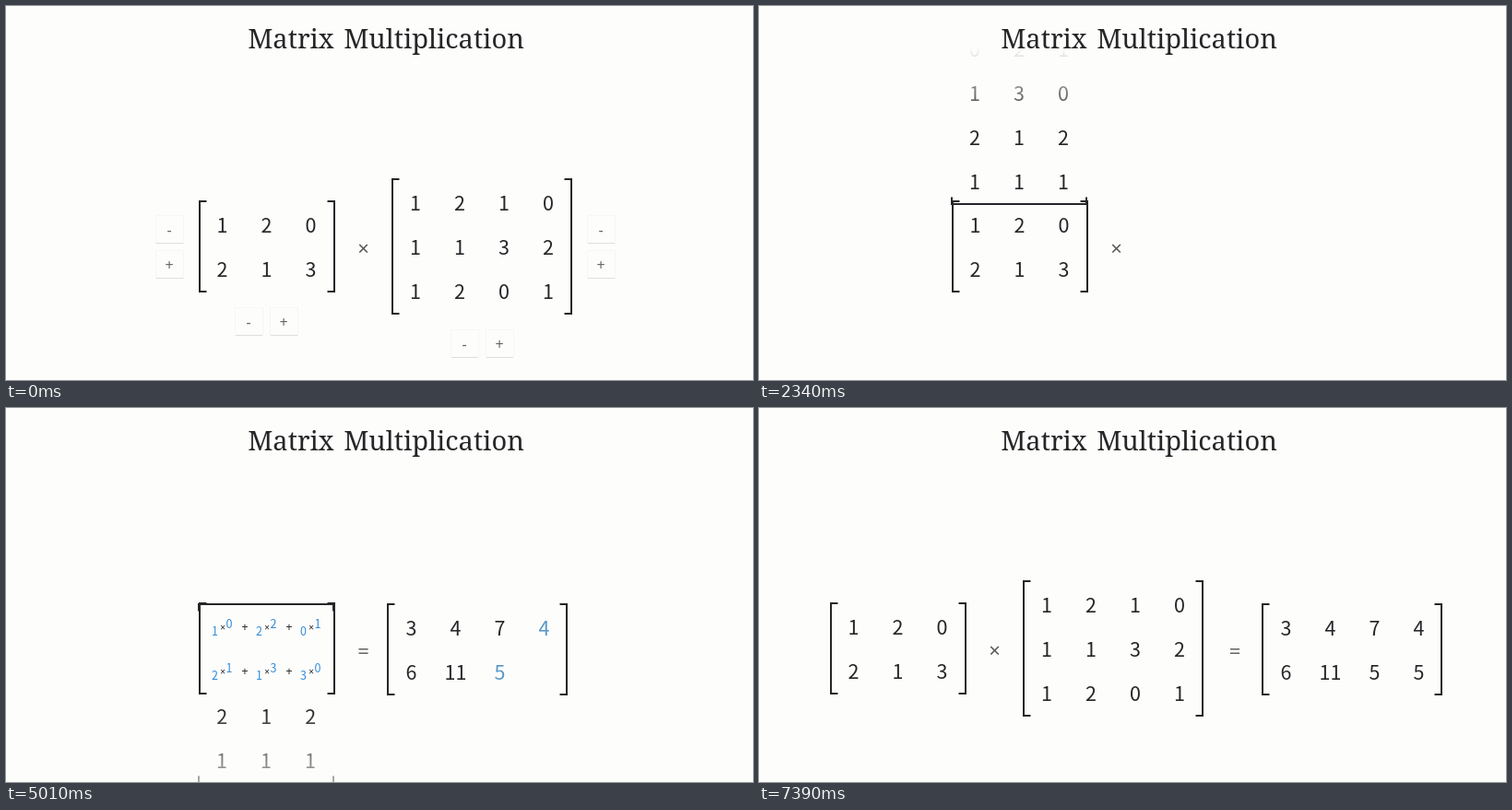
These frames come from a looping animation (810 by 406 pixels, 8.23 s). An HTML page with a canvas:

```html
<!DOCTYPE html>
<html lang="en">
<head>
<meta charset="utf-8">
<title>Matrix Multiplication</title>
<style>
  html, body { margin: 0; width: 100%; height: 100%; overflow: hidden; background: #fdfdfc; }
  canvas { display: block; }
</style>
</head>
<body>
<canvas id="stage" width="810" height="406"></canvas>
<script>
const ctx = document.getElementById('stage').getContext('2d');
const LOOP = 8230, CELL = 48, STEP = 511, STEP_START = 2972;
const PAPER = '253,253,252', INK = [38, 38, 40], INK_CSS = `rgb(${INK})`;
const BLUE = [48, 138, 215], RESULT = [88, 152, 200];
const DIGITS = '"Noto Sans CJK JP", "Noto Sans CJK SC", "Noto Sans CJK", "Noto Sans", sans-serif';
const SIGNS = '"Noto Sans", sans-serif';

const A = [[1, 2, 0], [2, 1, 3]];
const B = [[1, 2, 1, 0], [1, 1, 3, 2], [1, 2, 0, 1]];
const C = A.map(row => B[0].map((_, c) => row.reduce((sum, v, i) => sum + v * B[i][c], 0)));

const ramp = (t, from, to) => Math.min(1, Math.max(0, (t - from) / (to - from)));
const smooth = (p, power = 1.75) => p ** power / (p ** power + (1 - p) ** power);
const ease = (t, from, to) => smooth(ramp(t, from, to));
const mix = (a, b, p) => a + (b - a) * p;
const blend = (a, b, p) => `rgb(${a.map((v, i) => Math.round(mix(v, b[i], p)))})`;

function withAlpha(alpha, draw) {
  if (alpha <= 0) return;
  ctx.save();
  ctx.globalAlpha *= alpha;
  draw();
  ctx.restore();
}

function text(str, x, y, size, color, family) {
  ctx.font = `${size}px ${family}`;
  ctx.fillStyle = color;
  ctx.fillText(str, x, y);
}

const digit = (n, x, y, scale = 1, color = INK_CSS) =>
  text(n, x, y + 8 * scale, 21.5 * scale, color, DIGITS);

const sign = (str, x, y, size, alpha) =>
  withAlpha(alpha, () => text(str, x, y + size * 0.36, size, INK_CSS, SIGNS));

function brackets(cx, cy, cols, rows, angle = 0) {
  const w = cols * CELL / 2 + 1, h = rows * CELL / 2 + 1;
  ctx.save();
  ctx.translate(cx, cy);
  ctx.rotate(-angle);
  ctx.beginPath();
  for (const side of [-1, 1]) {
    const x = side * w, tip = side * (w - 7.5);
    ctx.moveTo(tip, -h);
    ctx.lineTo(x, -h);
    ctx.lineTo(x, h);
    ctx.lineTo(tip, h);
  }
  ctx.lineWidth = 2;
  ctx.strokeStyle = INK_CSS;
  ctx.stroke();
  ctx.restore();
}

// Calls fn with each entry's value, offset from the matrix centre, row and column
function eachCell(m, fn) {
  m.forEach((row, r) => row.forEach((v, c) =>
    fn(v, (c - (row.length - 1) / 2) * CELL, (r - (m.length - 1) / 2) * CELL, r, c)));
}

function button(label, x, y) {
  ctx.lineWidth = 1;
  ctx.strokeStyle = '#f6f6f4';
  ctx.strokeRect(x - 14.5, y - 15.5, 30, 30);
  ctx.strokeStyle = '#dededa';
  ctx.beginPath();
  ctx.moveTo(x - 14, y + 14.5);
  ctx.lineTo(x + 15, y + 14.5);
  ctx.stroke();
  sign(label, x, y, 16, 0.7);
}

function buttons() {
  for (const x of [177, 645]) {
    button('-', x, 243);
    button('+', x, 281);
  }
  for (const [x, y] of [[263, 343], [497, 367]]) {
    button('-', x, y);
    button('+', x + 38, y);
  }
}

// Covers the stage with paper from its edge, thinning out between two heights
function veil(from, to, edge) {
  const g = ctx.createLinearGradient(0, from, 0, to);
  g.addColorStop(0, `rgba(${PAPER},1)`);
  g.addColorStop(1, `rgba(${PAPER},0)`);
  ctx.fillStyle = g;
  ctx.fillRect(0, Math.min(edge, to), 810, Math.abs(edge - to));
}

function movingMatrix(t, s) {
  const cx = mix(516, 282, ease(t, 1580, 2290));
  const cy = mix(261, 118, ease(t, 1335, 1774)) + CELL * (Math.floor(s) + smooth(s % 1, 2.2));
  const turn = ease(t, 1642, 2292) * Math.PI / 2;
  const cos = Math.cos(turn), sin = Math.sin(turn);
  withAlpha(1 - ramp(t, 5600, 5870), () => {
    brackets(cx, cy, 4, 3, turn);
    eachCell(B, (v, x, y, r, c) => {
      const moved = ease(s, c + 0.3, c + 0.72) - ease(s, c + 2.6, c + 3.05);
      const small = ramp(s, c + 0.3, c + 1) - ramp(s, c + 2.45, c + 2.9);
      const fade = c === 3 ? 1 - ramp(t, 5560, 5760) : 1;
      withAlpha(fade, () => digit(v,
        cx + x * cos + y * sin + 8 * moved,
        cy - x * sin + y * cos + 1 - 5 * moved,
        mix(1, 0.58, small), blend(INK, BLUE, small)));
    });
  });
  if (t > 1335) veil(45, 125, 0);
  if (s > 0) veil(455, 325, 406);
}

function leftMatrix(shift, s) {
  const cx = 283 - shift;
  brackets(cx, 261, 3, 2);
  eachCell(A, (v, x, y, r, c) => {
    const end = r ? 5.3 : 4.6;
    const out = ease(s, end, end + 0.45);
    const small = ease(s, r + 0.3, r + 0.72) - out;
    const tint = ramp(s, r + 0.6, r + 1.1) - out;
    const px = cx - 0.5 + x, py = 262 + y;
    digit(v, px - 8 * small, py + 4 * small, mix(1, 0.58, small), blend(INK, BLUE, Math.max(0, tint)));
    sign('×', px + 0.5, py, 10, small);
    if (c < 2) sign('+', px + 24.5, py - 0.5, 13, small);
  });
}

function resultMatrix(t, shift, s) {
  withAlpha(ramp(t, 2540, 2900), () => {
    brackets(511 + shift, 262, 4, 2);
    eachCell(C, (v, x, y, r, c) => {
      const k = r + c + 1;
      withAlpha(ramp(s, k - 0.55, k - 0.25), () =>
        digit(v, 511.5 + shift + x, 263 + y, 1, blend(RESULT, INK, ramp(s, k + 0.02, k + 0.24))));
    });
  });
}

function draw(t) {
  const s = Math.min(6, Math.max(0, (t - STEP_START) / STEP));
  const shift = 132 * ease(t, 5720, 6420);
  const equals = ramp(t, 2540, 2800) - ramp(t, 5480, 5640);

  ctx.fillStyle = `rgb(${PAPER})`;
  ctx.fillRect(0, 0, 810, 406);
  ctx.textAlign = 'center';
  ctx.wordSpacing = '3px';

  if (t < 5880) movingMatrix(t, s);
  withAlpha(1 - ramp(t, 670, 1250), buttons);
  text('Matrix Multiplication', 412, 46, 29, INK_CSS, '"Noto Serif", serif');
  leftMatrix(shift, s);
  resultMatrix(t, shift, s);

  sign('×', 387.5 - shift, 263, 22, 0.75 * (1 - equals));
  sign('=', 387.5, 264, 22, 0.7 * equals);
  sign('=', 516, 264, 22, 0.7 * ramp(t, 6200, 6500));

  withAlpha(ramp(t, 6720, 7390), () => {
    brackets(384, 261, 4, 3);
    eachCell(B, (v, x, y) => digit(v, 384 + x, 262 + y));
  });
}

let start;
function tick(now) {
  start ??= now;
  draw((now - start) % LOOP);
  requestAnimationFrame(tick);
}
requestAnimationFrame(tick);
</script>
</body>
</html>
```
